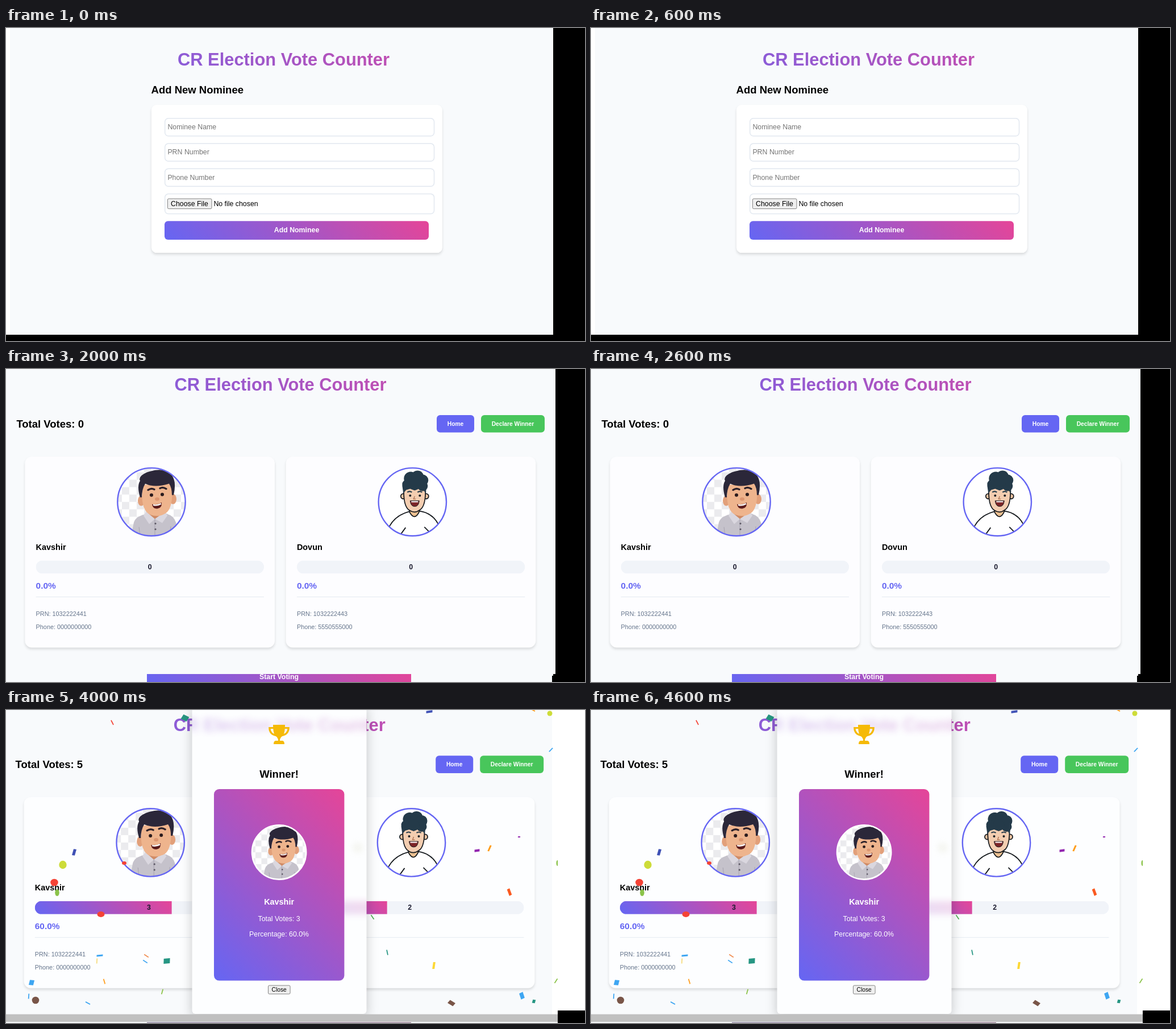
An HTML page for the animation above (5 s loop, 1019 px wide and 550 px high).

```html
<!DOCTYPE html>
<html lang="en">
<head>
<meta charset="utf-8">
<title>Vote counter</title>
<style>
  html, body { margin: 0; width: 100%; height: 100%; overflow: hidden; background: #000; }
  svg { display: block; width: 1019px; height: 550px; }
  text { font-family: "Liberation Sans", Arial, sans-serif; }
  .b { font-weight: bold; }
  .mid { text-anchor: middle; }
  .shadow { filter: drop-shadow(0 3px 2.3px rgba(0, 0, 0, .12)); }
  .soft { filter: drop-shadow(0 1.5px 1.5px rgba(0, 0, 0, .1)); }
  .modal { filter: drop-shadow(0 6px 10px rgba(0, 0, 0, .22)); }
  .blur { filter: blur(6px); }
</style>
</head>
<body>
<svg id="stage" viewBox="0 0 1019 550">
  <defs>
    <clipPath id="disc"><circle r="59"/></clipPath>
    <clipPath id="pill"><rect width="401.4" height="23" rx="11.5"/></clipPath>
    <clipPath id="dialog"><rect x="327.5" y="-10" width="307" height="544" rx="6"/></clipPath>
    <pattern id="checker" width="26" height="26" patternUnits="userSpaceOnUse">
      <path fill="#fff" d="M0 0H26V26H0Z"/><path fill="#ebebee" d="M0 0H13V26H26V13H0Z"/>
    </pattern>
    <g id="man" clip-path="url(#disc)">
      <circle r="59" fill="url(#checker)"/>
      <path fill="#c5c2cb" d="M-36 62L-31 36Q-28 26-12 22L24 20Q40 24 43 36L49 62Z"/>
      <ellipse cx="7" cy="21" rx="14" ry="9" fill="#cf8b66"/>
      <path fill="#dad7df" d="M-9 17L6 30L-4 39L-14 24ZM6 30L24 17L28 24L19 37Z"/>
      <path fill="none" stroke="#a7a3b0" d="M6 30V60M-22 44L-20 60M34 43L33 60"/>
      <g fill="#5f5b68"><circle cx="7" cy="38" r="1.6"/><circle cx="7" cy="48" r="1.6"/></g>
      <g fill="#e2a07a"><ellipse cx="-18" cy="-2" rx="6" ry="9"/><ellipse cx="38" cy="-5" rx="6" ry="9"/></g>
      <path fill="#eeb48d" d="M-16-30Q-20 14-3 22Q12 28 25 20Q39 11 36-32Z"/>
      <path fill="#2b2739" d="M-20-8Q-26-28-20-37Q-24-45-8-52Q20-62 34-49Q45-38 39-12L36-12Q36-25 31-32Q6-24-11-32Q-17-22-17-8Z"/>
      <path fill="none" stroke="#2b2029" stroke-width="3.2" stroke-linecap="round" d="M-6-21Q0-25 5-22M15-24Q20-27 26-23"/>
      <g fill="#2a1b1d"><circle cy="-12" r="3"/><circle cx="19" cy="-13" r="3"/></g>
      <ellipse cx="10" cy="-5" rx="4" ry="3" fill="#dd9670"/>
      <path fill="#5c1c1c" d="M1 4Q10 6 18 1Q19 11 10 12Q2 12 1 4Z"/>
      <path stroke="#fff" stroke-width="2.4" fill="none" d="M3 5.2Q10 7 17 3.2"/>
    </g>
    <g id="youth" clip-path="url(#disc)">
      <circle r="59" fill="#fff"/>
      <g stroke="#161a1e" stroke-width="1.8">
        <path fill="#fff" d="M-43 62L-40 42Q-29 23-6 17L13 16Q36 20 46 40L50 62"/>
        <path fill="#ecc091" d="M-5 10V18Q4 34 12 17V10Z"/>
        <path d="M-20 56L-12 45M30 53L21 44"/>
        <circle cx="-16" cy="-10" r="4.5" fill="#efc4a2"/><circle cx="24" cy="-10" r="4.5" fill="#efc4a2"/>
        <path fill="#f3cdb0" d="M-15-27Q-17 8-5 15Q4 21 13 14Q24 8 23-27Z"/>
      </g>
      <g fill="#243a49">
        <circle cx="-3" cy="-41" r="12"/><circle cx="9" cy="-44" r="11"/><circle cx="18" cy="-38" r="10"/>
        <circle cx="-10" cy="-31" r="8"/><circle cx="18" cy="-28" r="9"/><circle cx="4" cy="-31" r="10"/>
        <path d="M-18-29H25L23-15L19-22L11-23L4-20L-4-23L-11-21L-16-15Z"/>
      </g>
      <path fill="none" stroke="#243a49" stroke-width="2" d="M-9-17Q-5-20-1-17M9-17Q13-20 17-17"/>
      <g fill="#1c2227"><circle cx="-4" cy="-11" r="2"/><circle cx="13" cy="-11" r="2"/></g>
      <path fill="none" stroke="#b47b5c" stroke-width="1.5" d="M4-10L2-5H6"/>
      <path fill="#7c2427" stroke="#1c2227" d="M-4-2H12Q11 8 4 8Q-3 8-4-2Z"/>
      <path stroke="#fff" stroke-width="2" d="M-2-.3H10"/>
    </g>
  </defs>
</svg>
<script>
const BLUE = '#6566f3', PINK = '#e54598', PAGE = '#f8fafc', LINE = '#e2e8f0';
const SMALL = 10.28, BASE = 12.35, SUB = 14.43, HEAD = 18.5;
const nominees = [
  { name: 'Kavshir', art: 'man', prn: '1032222441', phone: '0000000000' },
  { name: 'Dovun', art: 'youth', prn: '1032222443', phone: '5550555000' }
];
let gradients = 0;

const rect = (x, y, w, h, fill, rx = 0, more = '') =>
  `<rect x="${x}" y="${y}" width="${w}" height="${h}" rx="${rx}" fill="${fill}" ${more}/>`;
const text = (x, y, size, str, fill = '#000', cls = '') =>
  `<text x="${x}" y="${y}" font-size="${size}" fill="${fill}" class="${cls}">${str}</text>`;
const group = (x, y, body) => `<g transform="translate(${x} ${y})">${body}</g>`;
const avatar = (art, x, y, scale) => `<use href="#${art}" transform="translate(${x} ${y}) scale(${scale})"/>`;

// Same geometry as a 45deg CSS gradient over the box; paint(url) draws with it.
function graded(x, y, w, h, paint) {
  const id = 'grad' + gradients++, cx = x + w / 2, cy = y + h / 2, r = (w + h) / 4;
  return `<linearGradient id="${id}" gradientUnits="userSpaceOnUse" x1="${cx - r}" y1="${cy + r}" x2="${cx + r}" y2="${cy - r}">
    <stop stop-color="${BLUE}"/><stop offset="1" stop-color="${PINK}"/></linearGradient>` + paint(`url(#${id})`);
}
const gradRect = (x, y, w, h, rx, more) => graded(x, y, w, h, url => rect(x, y, w, h, url, rx, more));
const wideButton = (y, label) =>
  gradRect(0, y, 465, 32.8, 6) + text(232.5, y + 20.3, BASE, label, '#fff', 'b mid');
const title = (cx, y) => graded(cx - 465, y - 28, 930, 36,
  url => text(cx, y, 30.85, 'CR Election Vote Counter', url, 'b mid'));
const nativeButton = (x, y, w, h) => rect(x, y, w, h, '#efefef', 2, 'stroke="#767676" stroke-width=".9"');

function form(dx, dy, card) {
  const field = (y, h, label = '') =>
    rect(271.7, y, 473.8, h, card, 6, `stroke="${LINE}" stroke-width="1.5"`) +
    text(276.4, y + 19.4, BASE, label, '#757575');
  return group(dx, dy,
    title(480.5, 40) +
    text(247.6, 89, HEAD, 'Add New Nominee', '#000', 'b') +
    rect(248, 109.5, 511.8, 260, card, 9.2, 'class="shadow"') +
    field(133.2, 31, 'Nominee Name') + field(177.5, 31, 'PRN Number') +
    field(221.7, 31, 'Phone Number') + field(266, 35) +
    nativeButton(276.4, 274.4, 77.6, 17.6) +
    text(282, 287.4, BASE, 'Choose File') + text(357.4, 287.4, BASE, 'No file chosen') +
    group(271, 0, wideButton(313.6, 'Add Nominee')));
}

const startButton = group(248, 0, wideButton(524.5, 'Start Voting'));

function nomineeRow(n, i) {
  return group(248, 416 + 54.3 * i,
    rect(0, 0, 465, 46, '#fdfdff', 6, 'class="soft"') +
    avatar(n.art, 23.4, 23, .264) +
    text(46.2, 27, BASE, n.name) +
    rect(404, 10.6, 22.8, 24.6, BLUE, 3) + rect(434.8, 10.6, 22.4, 24.6, '#e53b3b', 3) +
    `<path fill="none" stroke="#fff" stroke-width="1.2" d="M415 18.5H411.2V27.3H419V24"/>
     <path stroke="#fff" stroke-width="2.4" d="M414.3 24.2L420 18.3"/>
     <path fill="#fff" d="M441.5 17.6H444.5L445.2 16.8H447.6L448.3 17.6H451V19H441.5ZM442.2 19.8H450.4L449.8 27.4H442.8Z"/>`);
}

function dashboard(dx, dy, votes, card) {
  const total = votes[0] + votes[1];
  const button = (x, w, label, fill) =>
    rect(x, 81, w, 30.6, fill, 6) + text(x + w / 2, 99.6, SMALL, label, '#fff', 'b mid');
  const panel = (n, i) => {
    const share = total ? votes[i] / total : 0;
    return group(459.3 * i, 0,
      rect(33.4, 154, 439.6, 335.5, card, 12, 'class="shadow"') +
      avatar(n.art, 256, 233.6, 1) +
      `<circle cx="256" cy="233.6" r="59.7" fill="none" stroke="${BLUE}" stroke-width="2.4"/>` +
      text(52.6, 318, SUB, n.name, '#000', 'b') +
      group(52.6, 336.5, `<g clip-path="url(#pill)">` + rect(0, 0, 401.4, 23, '#f1f4f9') +
        (share ? gradRect(0, 0, 401.4 * share, 23, 0) : '') + '</g>') +
      text(253.3, 352, BASE, votes[i], '#1a1a2e', 'b mid') +
      text(52.6, 385.6, 15.42, (share * 100).toFixed(1) + '%', BLUE, 'b') +
      rect(52.6, 400, 401.4, .9, LINE) +
      text(52.6, 434, 10.85, 'PRN: ' + n.prn, '#64748b') +
      text(52.6, 457, 10.85, 'Phone: ' + n.phone, '#64748b'));
  };
  return group(dx, dy,
    title(483, 38) + text(18.4, 102.6, HEAD, 'Total Votes: ' + total, '#000', 'b') +
    button(758, 66, 'Home', BLUE) + button(836, 112, 'Declare Winner', '#48c65b') +
    nominees.map(panel).join(''));
}

function confetti() {
  const red = '#f44336', teal = '#269683', indigo = '#3f51b5', lime = '#cddc39', sky = '#3ea6f2',
    green = '#8bc34a', orange = '#ff9d1c', purple = '#9327b0', brown = '#795548';
  const chip = ([color, x, y, w, h, turn]) =>
    rect(-w / 2, -h / 2, w, h, color, 0, `transform="translate(${x} ${y}) rotate(${turn}) skewX(-8)"`);
  const streamer = ([color, x, y, turn]) => chip([color, x, y, 1.8, 9, turn]);
  const dot = ([color, x, y, rx, ry]) =>
    `<ellipse cx="${x}" cy="${y}" rx="${rx}" ry="${ry}" fill="${color}"/>`;
  return [
    [teal, 315, 14, 11, 9, 25], [indigo, 745, 3, 11, 4, -8], [indigo, 120, 250, 5, 11, 8],
    [purple, 829, 247, 9, 4, -8], [purple, 903, 223, 4, 2, 0], [orange, 851, 243, 3, 11, 16],
    ['#fa5a21', 886, 320, 5, 12, -28], ['#fdd835', 753, 449, 4, 12, 0], [sky, 165, 431.5, 11, 3, -6],
    [teal, 283, 441, 11, 9, -6], [sky, 45, 479, 8, 9, 6], [brown, 784, 515, 11, 7, 32],
    [sky, 908, 502, 7, 11, -26], [teal, 929, 512, 5, 6, 8]
  ].map(chip).join('') + [
    [red, 187, 22, -35], [orange, 927, 0, -70], [sky, 959, 70, 35], ['#4caf50', 645, 364, -42],
    [teal, 671, 426, -20], ['#f6dc80', 160, 441, -4], ['#f08a4b', 247, 432, -65], [sky, 245, 442, -65],
    [orange, 173, 477, -25], [sky, 40, 503, -4], [sky, 144, 515, -70], [green, 275, 495, 8], [green, 968, 476, 25]
  ].map(streamer).join('') + [
    [lime, 957, 6, 4.5, 4.5], [lime, 100, 272, 6.7, 7.2], [red, 85, 303, 6.8, 6.3], [green, 90, 321, 3.8, 6],
    [red, 167, 359, 6.5, 5], [red, 208, 269, 4, 3], [brown, 52, 510, 6.3, 6.3], [green, 971, 269, 2.5, 5]
  ].map(dot).join('');
}

function winnerDialog() {
  const [winner] = nominees;
  return rect(327.5, -10, 307, 544, '#fdfeff', 6, 'class="modal"') +
    `<g clip-path="url(#dialog)">
      <g class="blur" opacity=".32">${title(481, 37)}</g>
      <g class="blur" opacity=".2">${gradRect(510, 335.8, 160, 23, 0)}<circle cx="619" cy="242" r="8" fill="#c9c9a0"/></g>
    </g>
    <path fill="#f5ba08" d="M470 26H491Q491 43 486 46Q482 49 482 54H487Q490 55 490 60H471Q471 55 474 54H479Q479 49 475 46Q470 43 470 26Z"/>
    <path fill="none" stroke="#f5ba08" stroke-width="3.2" d="M471 31.5H463.8Q464 43 477 45M490 31.5H497.2Q497 43 484 45"/>` +
    text(480.5, 118.6, HEAD, 'Winner!', '#000', 'b mid') +
    gradRect(366, 139, 229.4, 336.6, 9.2) +
    avatar(winner.art, 480.6, 250, .8) +
    '<circle cx="480.6" cy="250" r="47.6" fill="none" stroke="#fff" stroke-width="2.6"/>' +
    text(480.6, 342, SUB, winner.name, '#fff', 'b mid') +
    text(480.6, 371.4, BASE, 'Total Votes: 3', '#fff', 'mid') +
    text(480.6, 398.3, BASE, 'Percentage: 60.0%', '#fff', 'mid') +
    nativeButton(461.5, 484, 38.6, 15) + text(480.7, 495.2, SMALL, 'Close', '#000', 'mid');
}

const black = rect(0, 0, 1019, 550, '#000');
const listPage = black + rect(0, 0, 963, 539, PAGE) + rect(0, 539, 961, 11, PAGE);
const votePage = listPage + startButton + rect(0, 0, 967, 536, PAGE);
const whiteEdge = votePage + rect(961, 0, 58, 528, '#fff');
const scenes = [
  black + rect(0, 0, 7, 539, '#fff') + rect(7, 0, 956, 539, PAGE) + form(8, 25.6, '#fff'),
  listPage + form(0, 0, '#fdfdff') + text(247.6, 398, SUB, 'Added Nominees', '#000', 'b') +
    nominees.map(nomineeRow).join('') + startButton,
  votePage + dashboard(0, 0, [0, 0], '#fdfdff'),
  whiteEdge + dashboard(-3.3, -2, [3, 2], '#fff'),
  whiteEdge + rect(961, 528, 10, 22, '#fff') + dashboard(-1.8, -.7, [3, 2], '#fdfeff') +
    confetti() + rect(971, 0, 48, 528, '#fff') + winnerDialog() +
    rect(0, 534.6, 971, 13.6, '#c0c0c0') + rect(0, 548.2, 971, 1.8, PAGE) + rect(248, 549, 465, 1, '#8a7c8c')
];

const stage = document.getElementById('stage');
stage.insertAdjacentHTML('beforeend', scenes.map(s => `<g class="scene">${s}</g>`).join(''));
const layers = [...stage.querySelectorAll('.scene')];

function tick() {
  const current = Math.floor(performance.now() % 5000 / 1000);
  layers.forEach((layer, i) => layer.style.display = i === current ? '' : 'none');
  requestAnimationFrame(tick);
}
tick();
</script>
</body>
</html>
```
